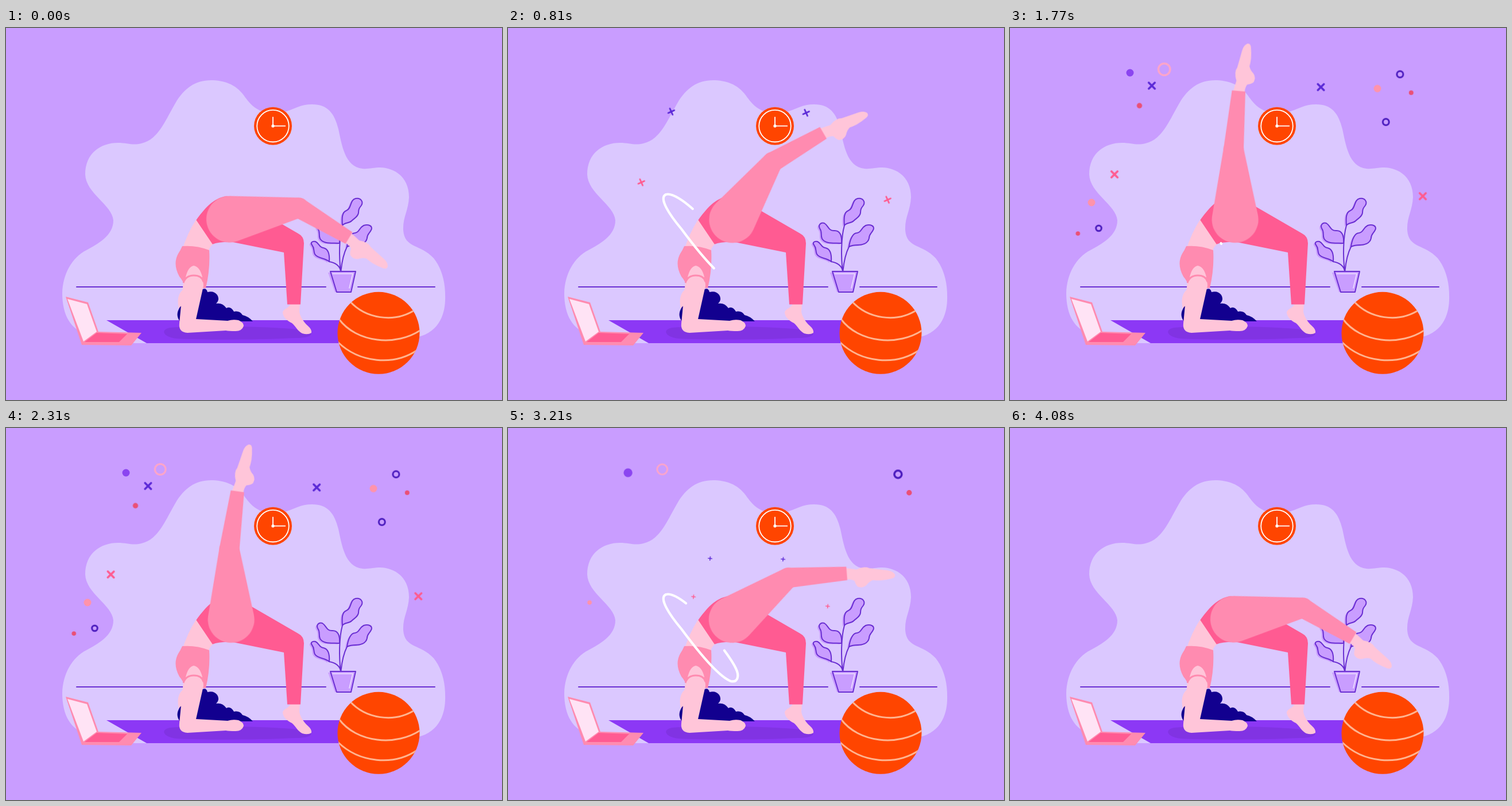
Animation of 864 by 648 pixels, one loop 4.5 s. Source, as an HTML page without scripts:

```html
<!DOCTYPE html>
<html lang="en">
<head>
<meta charset="utf-8">
<title>Yoga at home</title>
<style>
html, body { margin: 0; width: 100%; height: 100%; overflow: hidden; background: #c99dff; }
svg { display: block; width: 100vw; height: 100vh; }

.bg { fill: #c99dff; }
.cloud { fill: #dbc8ff; }
.pink { fill: #ff8bb0; }
.rose { fill: #ff5b92; }
.skin { fill: #ffc5d9; }
.orange { fill: #ff4500; }
.line { fill: none; stroke: #6a2fd2; stroke-width: 2; stroke-linejoin: round; stroke-linecap: round; }
.leaf { fill: #c99dff; }
.shine { fill: none; stroke: #efe3ff; stroke-width: 1.5; stroke-linecap: round; }

.thigh, .shin, .hoop, .cross, .pop { animation: 4500ms linear infinite; }
.thigh { animation-name: thigh; }
.shin { animation-name: shin; }
.hoop { animation-name: hoop; fill: none; stroke: #fff; stroke-width: 4.2; stroke-linecap: round; }
.cross { animation-name: cross; fill: none; stroke-width: 3.5; stroke-linecap: round; }
.early { animation-name: early; }
.late { animation-name: late; }
.last { animation-name: last; }
.steady { animation-name: steady; }

.violet { stroke: #5a28d6; }
.coral { stroke: #ff5b8f; }
.ring { fill: none; stroke: #4a1bbd; stroke-width: 3; }
.red { fill: #ea5076; }
.peach { fill: #ff93ab; }

@keyframes thigh {
  0%, 1.333% { transform: rotate(-9deg); animation-timing-function: cubic-bezier(.333, 0, .667, .564); }
  10.667% { transform: rotate(-31.6deg); animation-timing-function: cubic-bezier(.333, .357, .667, .745); }
  26% { transform: rotate(-76.3deg); animation-timing-function: cubic-bezier(.333, .69, .667, 1); }
  39.333% { transform: rotate(-90.8deg); }
  50.667% { transform: rotate(-91deg); animation-timing-function: cubic-bezier(.6, 0, .9, .4); }
  62% { transform: rotate(-89.8deg); animation-timing-function: cubic-bezier(.333, .078, .667, .688); }
  71.333% { transform: rotate(-36.3deg); animation-timing-function: cubic-bezier(.2, .74, .5, 1); }
  90.667%, 100% { transform: rotate(-9deg); }
}
@keyframes shin {
  0%, 1.333% { transform: rotate(40deg); animation-timing-function: cubic-bezier(.333, 0, .667, .667); }
  10.667% { transform: rotate(31.3deg); }
  26% { transform: rotate(17.6deg); animation-timing-function: cubic-bezier(.333, .4, .6, 1); }
  39.333% { transform: rotate(5.8deg); animation-timing-function: cubic-bezier(.6, 0, .7, .5); }
  50.667% { transform: rotate(8.5deg); animation-timing-function: cubic-bezier(.333, .15, .667, .7); }
  62% { transform: rotate(23.6deg); }
  71.333% { transform: rotate(31.9deg); animation-timing-function: cubic-bezier(.25, .5, .6, 1); }
  90.667%, 100% { transform: rotate(40deg); }
}
/* visible part of the hoop: dash length and its start */
@keyframes hoop {
  0%, 9.77% { opacity: 0; stroke-dasharray: 0 200; stroke-dashoffset: 0; }
  9.78% { opacity: 1; stroke-dasharray: 0 200; stroke-dashoffset: 0; }
  10.667% { stroke-dasharray: 11 200; stroke-dashoffset: 0; }
  12.667% { stroke-dasharray: 30 200; stroke-dashoffset: 0; }
  19% { stroke-dasharray: 68 200; stroke-dashoffset: -3; }
  26% { stroke-dasharray: 52.5 200; stroke-dashoffset: -39.5; }
  30% { stroke-dasharray: 35 200; stroke-dashoffset: -65; }
  39.333% { opacity: 1; stroke-dasharray: .3 200; stroke-dashoffset: -99.7; }
  40.667% { opacity: 1; stroke-dasharray: 0 200; stroke-dashoffset: -100; }
  40.677%, 60.88% { opacity: 0; stroke-dasharray: 0 200; stroke-dashoffset: -100; }
  60.89% { opacity: 1; stroke-dasharray: 0 200; stroke-dashoffset: -100; }
  62% { stroke-dasharray: 10 200; stroke-dashoffset: -90; }
  66.667% { stroke-dasharray: 55 200; stroke-dashoffset: -45; }
  71.333% { stroke-dasharray: 88.5 200; stroke-dashoffset: -7; }
  73.333% { stroke-dasharray: 87 200; stroke-dashoffset: 0; }
  78% { stroke-dasharray: 36 200; stroke-dashoffset: 0; }
  85.33% { opacity: 1; stroke-dasharray: 0 200; stroke-dashoffset: 0; }
  85.34%, 100% { opacity: 0; stroke-dasharray: 0 200; stroke-dashoffset: 0; }
}
@keyframes cross {
  0%, 10% { transform: rotate(-90deg) scale(0); }
  10.667% { transform: rotate(-90deg) scale(.14); animation-timing-function: cubic-bezier(.25, .35, .45, .97); }
  26% { transform: translate(calc(var(--x) * .978), calc(var(--y) * .978)) scale(1); animation-timing-function: ease-out; }
  39.333%, 48% { transform: translate(var(--x), var(--y)) rotate(45deg) scale(1); animation-timing-function: cubic-bezier(.5, 0, .8, .5); }
  62% { transform: translate(calc(var(--x) * .917), calc(var(--y) * .917)) rotate(57deg) scale(.97); animation-timing-function: cubic-bezier(.333, .12, .667, .667); }
  71.333% { transform: translate(calc(var(--x) * .205), calc(var(--y) * .205)) rotate(96deg) scale(.42); }
  74%, 100% { transform: rotate(120deg) scale(0); }
}
@keyframes early {
  0%, 20% { transform: scale(0); }
  26% { transform: scale(1.3); }
  31%, 61.5% { transform: scale(1); }
  65% { transform: scale(1.25); }
  69%, 100% { transform: scale(0); }
}
@keyframes steady {
  0%, 22% { transform: scale(0); }
  26% { transform: scale(.8); }
  29% { transform: scale(1.2); }
  33%, 63% { transform: scale(1); }
  66% { transform: scale(1.2); }
  71.333% { transform: scale(var(--end, 0)); }
  72.5%, 100% { transform: scale(0); }
}
@keyframes late {
  0%, 25.3% { transform: scale(0); }
  26% { transform: scale(var(--in, .18)); }
  30.5% { transform: scale(1.25); }
  35%, 66% { transform: scale(1); }
  71.333% { transform: scale(1.18); }
  76%, 100% { transform: scale(0); }
}
@keyframes last {
  0%, 28% { transform: scale(0); }
  35% { transform: scale(1.25); }
  39.333% { transform: scale(1.1); }
  43%, 69% { transform: scale(1); }
  71.333% { transform: scale(.95); }
  73% { transform: scale(1.2); }
  77%, 100% { transform: scale(0); }
}
</style>
</head>
<body>
<svg viewBox="0 0 864 648">
  <defs>
    <path id="plus" d="M-7.6 0H7.6M0-7.6V7.6"/>
    <clipPath id="round"><circle cx="649" cy="531.300" r="71.500"/></clipPath>
    <g id="leaves">
      <path d="M586 344C585 331 585 321 593 318C602 315 599 299 609 297C618 295 623 303 619 309C615 314 614 316 614 322C613 329 607 331 602 336C597 341 590 338 586 344Z"/>
      <path d="M581 375C582 361 578 353 569 353C558 354 558 344 551 340C545 338 540 343 543 349C548 356 544 360 547 367C553 377 568 374 581 375Z"/>
      <path d="M594 381C596 367 601 357 608 357C616 356 615 348 623 344C631 341 640 345 636 352C633 358 629 359 629 366C627 376 616 378 609 378C603 378 598 379 594 381Z"/>
      <path d="M563 407C564 394 562 385 553 383C545 382 546 375 539 372C533 371 530 374 533 378C538 384 535 388 538 394C543 402 555 400 563 407Z"/>
    </g>
  </defs>

  <rect class="bg" width="864" height="648"/>
  <path class="cloud" d="M295 131C310 105 330 91 357 91C380 91 400 98 414 117C428 137 440 147 465 149C492 150 505 133 533 133C560 133 572 148 579 176C585 203 590 242 621 245C632 246 640 243 652 243C680 244 702 262 702 295C701 318 691 330 692 352C694 384 722 376 745 401C760 420 766 445 765 474C764 510 745 532 718 538L640 549H150L122 524C105 511 98 488 98 462C99 428 115 400 140 387C160 376 187 362 187 335C185 308 139 288 138 255C138 218 165 200 195 200C212 200 220 205 236 201C265 195 278 160 295 131Z"/>
  <path class="line" d="M123 451H557M613 451H747"/>

  <!-- clock -->
  <g transform="translate(465 170.700)">
    <circle class="orange" r="33"/>
    <g fill="none" stroke="#fff" stroke-width="1.800">
      <circle r="27.800"/>
      <path d="M0-16V0H22"/>
    </g>
    <circle r="2.600" fill="#fff"/>
  </g>

  <!-- plant -->
  <use href="#leaves" class="leaf" x="-3" y="2"/>
  <use href="#leaves" class="leaf"/>
  <use href="#leaves" class="line"/>
  <path class="line" d="M583 423C580 400 580 365 586 344M563 407C575 409 581 414 583 423M594 381C588 393 585 408 583.500 423"/>
  <path class="leaf" d="M561 426H606L599 460H573Z"/>
  <path class="leaf" d="M565 424H609L601 460H576Z"/>
  <path class="shine" d="M569 428H604L598 453"/>
  <path class="line" d="M565 424H609L601 460H576Z"/>

  <!-- mat -->
  <path fill="#8c38f5" d="M175 509H600V549H245Z"/>
  <path fill="#8133e3" d="M286 522C330 518 480 519 520 527C542 532 530 540 505 540C440 543 350 544 297 541C272 538 269 525 286 522Z"/>

  <!-- laptop -->
  <path class="pink" d="M104 468L143 478L161 529L236 531L218 553L132 552Z"/>
  <path fill="#ffe3f5" d="M107 472L141 481L158 529L135 546Z"/>
  <path class="rose" d="M137 547L158 531L211 533L197 547Z"/>

  <!-- confetti -->
  <g transform="translate(209 78)"><circle class="pop late" style="--in:.45" r="6.500" fill="#8b45f0"/></g>
  <g transform="translate(268.700 72)"><circle class="pop last" r="9.300" fill="none" stroke="#ffa5c8" stroke-width="3"/></g>
  <g transform="translate(225.500 135.300)"><circle class="pop early red" r="4.700"/></g>
  <g transform="translate(640 105.500)"><circle class="pop steady peach" r="6.500"/></g>
  <g transform="translate(679.400 80.600)"><circle class="pop late ring" r="5.500"/></g>
  <g transform="translate(698.800 112.700)"><circle class="pop late red" r="4"/></g>
  <g transform="translate(654.800 163.700)"><circle class="pop early ring" r="5.400"/></g>
  <g transform="translate(142 304)"><circle class="pop steady peach" style="--end:.6" r="6.500"/></g>
  <g transform="translate(154.500 348.800)"><circle class="pop early ring" r="4.800"/></g>
  <g transform="translate(118.300 358)"><circle class="pop early red" r="3.800"/></g>

  <g transform="translate(379 260)"><use href="#plus" class="cross violet" style="--x:-132px;--y:-159.5px"/></g>
  <g transform="translate(463 261)"><use href="#plus" class="cross violet" style="--x:78.5px;--y:-158px"/></g>
  <g transform="translate(359.400 304)"><use href="#plus" class="cross coral" style="--x:-177.4px;--y:-49px"/></g>
  <g transform="translate(515 315)"><use href="#plus" class="cross coral" style="--x:204px;--y:-22px"/></g>

  <!-- standing leg -->
  <path class="skin" d="M496 479C495 488 483 488 482 496C483 504 490 510 498 514C505 520 508 528 516 532Q526 535 532 531Q533 525 526 519C518 512 512 502 511 494L512 479Z"/>
  <path class="rose" d="M331 335C344 317 361 295 385 293Q400 293 408 299.500L509 358Q519 363 519 375L513 481.500H490L484 391L395 373Q372 372 359 377Z"/>

  <!-- body -->
  <path class="skin" d="M308 456Q296 466 301 489L318 490V452Z"/>
  <path fill="#12008f" d="M340 456Q349 451 351 460Q362 457 368 465Q373 473 366 480Q377 478 384 488Q391 484 397 494Q407 492 412 500Q422 502 430 511H303Q294 500 303 486Z"/>
  <path class="skin" d="M331 334L360 377Q354 382 353 389H306Q316 357 331 334Z"/>
  <path class="pink" d="M307 380Q331 378 354 387Q356 420 348 453L312 452Q309 441 302 433Q290 411 300 393Q304 387 307 380Z"/>
  <path class="skin" d="M313 434Q317 416 327 414Q338 416 342 434L330 440Z"/>
  <path class="skin" d="M308 452Q309 431 327 431Q344 431 344 449L331 507L386 510Q395 507 405 509Q414 513 414 519Q411 528 400 528Q388 528 383 527L316 531Q300 530 302 514Z"/>
  <path fill="none" stroke="#ff8bb0" stroke-width="3" d="M309 444Q313 431 327 431Q341 431 344 442"/>

  <!-- raised leg -->
  <g transform="translate(391.100 331.800)">
    <g class="thigh">
      <g transform="translate(120 0)">
        <g class="shin">
          <path class="skin" d="M101-9.500Q113-7 120-5.500Q134-11 143-6Q158-3 174 0Q183 2 186 8Q187 13 181 14.500Q160 18 147 15Q140 17 135 23Q129 28 121 25Q117 23 115 14Q110 10 101 10.500Z"/>
          <path class="pink" d="M1-17.500L102.500-11.700V11.700L1 17.500A17.500 17.500 0 0 1 1-17.500Z"/>
        </g>
      </g>
      <path class="pink" d="M5.700-38.800L123.300-17.200A17.500 17.500 0 0 1 123.300 17.200L5.700 40.800A40.500 40.500 0 1 1 5.700-38.800Z"/>
    </g>
  </g>

  <path class="hoop" pathLength="100" d="M328 321C315 308 288 286 275 290C262 296 281 325 302 350C325 381 365 432 388 441C401 444 403 431 397 419C391 406 378 389 367.500 375"/>

  <!-- ball -->
  <circle class="orange" cx="649" cy="531.300" r="71.500"/>
  <path clip-path="url(#round)" fill="none" stroke="#ffb48f" stroke-width="3" d="M599 476C625 505 675 516 714 490M580 507C610 548 680 556 724 525M578 547C615 583 675 590 718 560"/>
</svg>
</body>
</html>
```
